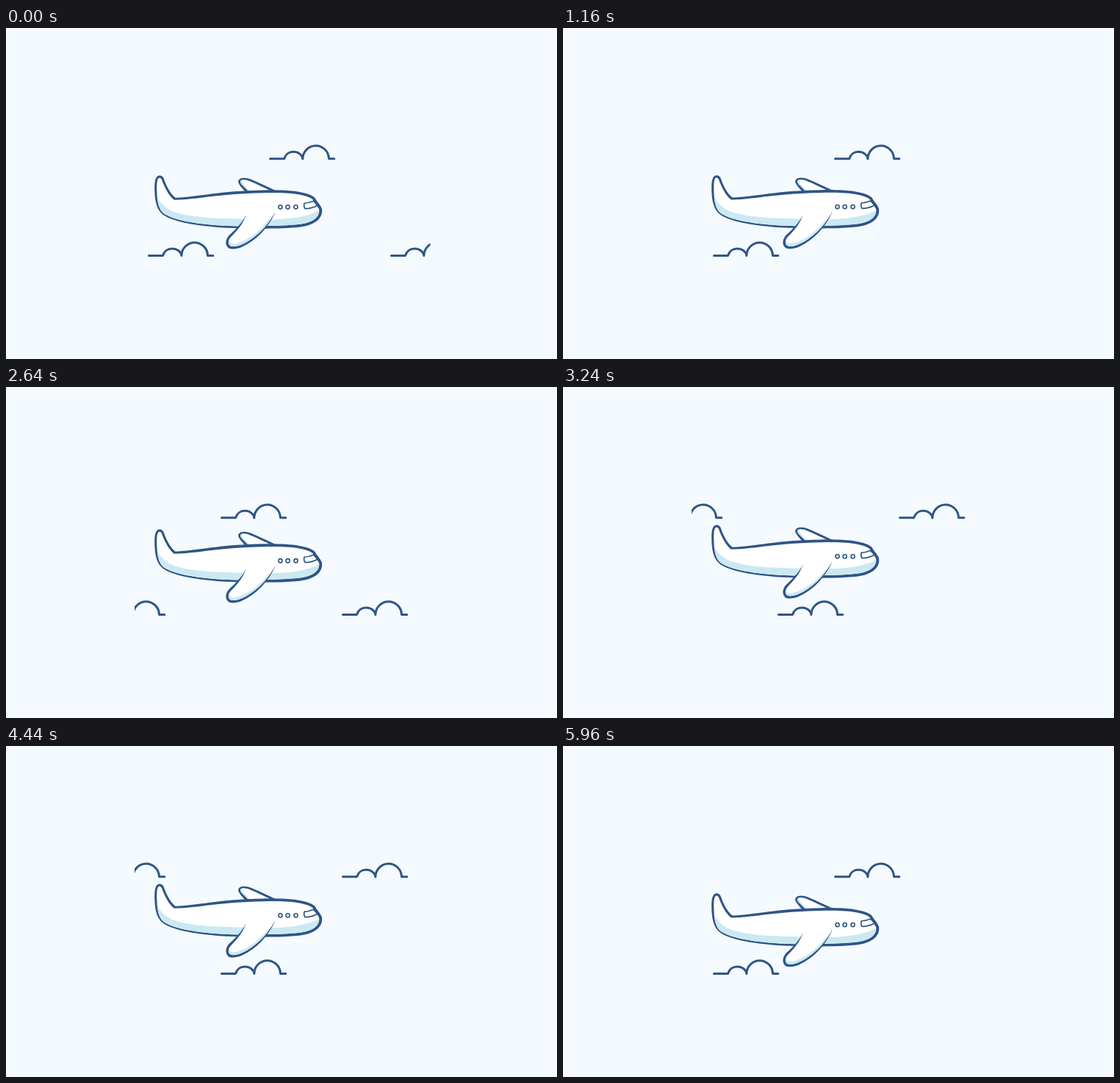
Write an HTML page with a canvas that moves like this. It is 750 by 450 pixels and loops after 6000 ms.

```html
<!DOCTYPE html>
<html lang="en">
<head>
<meta charset="utf-8">
<title>Plane in flight</title>
<style>
html, body { margin: 0; width: 100%; height: 100%; overflow: hidden; background: #f5faff; }
canvas { display: block; width: 750px; height: 450px; }
</style>
</head>
<body>
<canvas id="stage" width="750" height="450"></canvas>
<script>
const ctx = document.getElementById('stage').getContext('2d');
const SKY = '#f5faff', INK = '#2f5586', SHADE = '#cbe9f2', WHITE = '#ffffff';
const LOOP = 6000, CYCLE = 1200, STEP = 40;
const GAP = 330, RISE = 20;

const path = d => new Path2D(d);

const cloud = path('M359.5 177.8H378.6C380.3 172 385 168.3 391 168.3C398 168.3 403.3 172.5 403.9 178A17.8 17.8 0 0 1 439.5 177.8H446.8');

const bodyOuter = path('M202.3 222C201.9 210 202.8 200.6 209 200.5C214.6 200.5 214.8 205.5 217.6 212C220.8 219.5 225.5 227 230.8 230.7C262 229.6 290 221.2 350 220.4C386 219.7 411 222.5 420.6 231C423.4 236.5 427.5 239.5 430 245.5C431.8 257 423.5 264.8 410 268.8C392 273.4 352 272.8 317 272.3C280 271.4 236 267 215.5 255C205 248.5 202.7 235 202.3 222Z');
const bodyInner = path('M205.4 222C205 211 205.6 203.8 209 203.7C212 203.7 212.3 207.5 214.8 213.3C218 220.8 223 229.3 229 233.8C262 232.8 291 225.2 350 224.2C384 223.5 407 225.6 417.2 232.8C419.5 237.6 423.6 241.6 426.2 246.4C427.2 255 421 261.5 409 264.9C392 269.2 352 269 317 269.4C280 269 236 264.6 216.4 253.3C207.5 248 205.6 235 205.4 222Z');
const belly = path('M200 226L205 228C209 237 216 245 229 250C254 258.5 290 258.8 330 259.8C370 261.5 408 259.5 430 246V275H200Z');

const rearOuter = path('M326 223C321 217 314.5 211 316.4 207.2C318.6 202.8 327 203 333.5 205.8C345 210.5 357 216.5 368 221.5L364 223Z');
const rearInner = path('M329.5 221.5C325 216.5 317.6 211.2 319 208.3C320.6 205.3 327 206 332.5 208.5C342 212.5 352 217.2 361 221.5Z');
const rearShade = path('M316 206L320.5 207C321.5 212 328 217 334 223H326Z');

const wingOuter = path('M326.3 254.8C321 265.5 313 273.5 304 281.5C299 286.5 297.6 294 302.2 298.6C305.5 301.8 314 300.8 321 297.8C341 289 357 271 366 251.8Q365.5 251.2 364.8 252.3L326.7 255.4Z');
const wingInner = path('M326.3 255.3C322 267 315 275.5 306.6 283.6C302.7 287.6 301.6 292.8 304.6 295.8C307 298 314 297.2 320 294.8C339 286.8 355 270 365.4 252.2C357 250 339 250 326.3 255.3Z');
const wingShade = path('M300 285L304 286.5C303.3 291.8 306.5 294 311 293.2C331 289.8 347 274 359 259L352 278L325 300L300 302Z');

const screen = path('M406 238.3C410.5 238.1 415 236.9 418.5 235.3L424 241C419.5 243.9 413 245.6 407 245.6C405.6 243.6 405.4 240.5 406 238.3Z');

function fill(shape, color) {
  ctx.fillStyle = color;
  ctx.fill(shape);
}

function outline(shape, width) {
  ctx.strokeStyle = INK;
  ctx.lineWidth = width;
  ctx.stroke(shape);
}

function part(outer, inner, shade) {
  fill(outer, INK);
  fill(inner, WHITE);
  ctx.save();
  ctx.clip(inner);
  fill(shade, SHADE);
  ctx.restore();
}

function drawCloud(x, y) {
  ctx.save();
  ctx.translate(x, y);
  outline(cloud, 3);
  ctx.restore();
}

function drawClouds(phase) {
  ctx.save();
  ctx.beginPath();
  ctx.rect(175, 150, 402.5, 170);
  ctx.clip();
  for (let i = 0; i < 2; i++) {
    const x = GAP * (i - phase);
    drawCloud(x, 0);
    drawCloud(x - GAP / 2, 131.6);
  }
  ctx.restore();
}

function drawPlane(y) {
  ctx.save();
  ctx.translate(0, y);
  part(rearOuter, rearInner, rearShade);
  part(bodyOuter, bodyInner, belly);
  for (const x of [373.5, 383.6, 394.5]) {
    const pane = new Path2D();
    pane.arc(x, 243.3, 2.6, 0, Math.PI * 2);
    outline(pane, 1.6);
  }
  outline(screen, 1.6);
  part(wingOuter, wingInner, wingShade);
  ctx.restore();
}

function draw(time) {
  const t = Math.floor(time % LOOP / STEP) * STEP;
  const phase = t % CYCLE / CYCLE;
  const k = 1 - Math.abs(1 - 2 * phase);
  ctx.fillStyle = SKY;
  ctx.fillRect(0, 0, 750, 450);
  drawClouds(phase);
  drawPlane(-RISE * k * k * (3 - 2 * k));
}

ctx.lineCap = ctx.lineJoin = 'round';
const start = performance.now();
function tick() {
  draw(performance.now() - start);
  requestAnimationFrame(tick);
}
tick();
</script>
</body>
</html>
```
